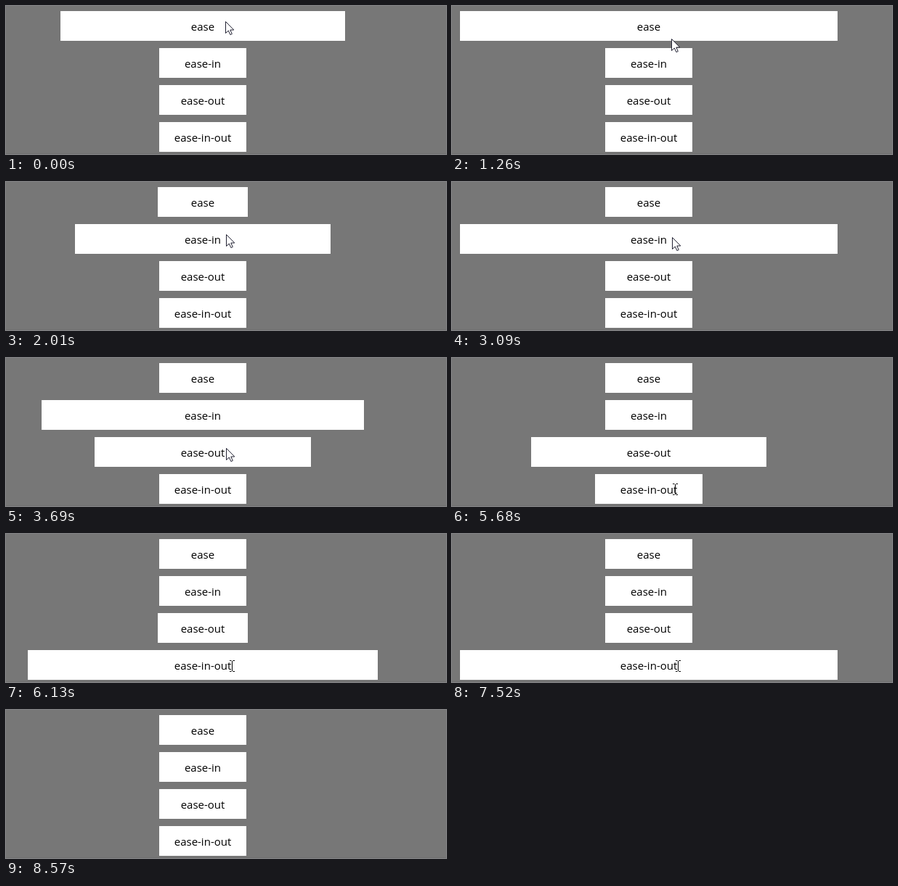
An HTML page that plays this animation: 606x204 px, repeating every 9.55 s.

```html
<!DOCTYPE html>
<html lang="en">
<head>
<meta charset="utf-8">
<title>Easing demo</title>
<style>
html, body { margin: 0; width: 100%; height: 100%; overflow: hidden; background: #777; }
#stage { position: relative; width: 606px; height: 204px; overflow: hidden; box-shadow: inset 0 -1px #707070; }
.box {
  position: absolute; height: 41px; background: #fff; color: #000;
  font: 15px/42px "Open Sans", "Noto Sans", sans-serif; text-align: center; white-space: nowrap;
}
svg { position: absolute; left: 0; top: 0; }
</style>
</head>
<body>
<div id="stage">
  <svg width="606" height="204" style="z-index:1">
    <path id="arrow" d="M.5 .5V16.5L4.3 13L6.9 18.6L9.3 17.5L6.8 12H11.8Z" fill="#fff" stroke="#223" stroke-linejoin="round"/>
    <path id="beam" d="M-3.5 -7.5H-1M1 -7.5H3.5M-3.5 7.5H-1M1 7.5H3.5M0 -7V7" fill="none" stroke="#000"/>
  </svg>
</div>
<script>
const LOOP = 9550, DURATION = 750, CENTER = 271, NARROW = 120, GROWTH = 400;

// label, bezier control points, time the pointer enters, time it leaves
const boxes = [
  ['ease', [.25, .1, .25, 1], -298, 1357],
  ['ease-in', [.42, 0, 1, 1], 1470, 3410],
  ['ease-out', [0, 0, .58, 1], 3465, 5429],
  ['ease-in-out', [.42, 0, .58, 1], 5541, 7814],
];

// stretches of movement: start, end, step
const runs = [
  [0, 480, 120], [1260, 2310, 150], [3090, 4290, 150], [5380, 6280, 150], [7520, 8570, 150],
];

// pointer: time, x, y, shape
const pointer = [
  [0, 302, 21, 'arrow'], [1259, 302, 21, 'arrow'], [1260, 302, 45, 'arrow'],
  [1410, 302, 53, 'arrow'], [1560, 303, 66, 'arrow'], [1710, 303, 72, 'arrow'],
  [3089, 303, 72, 'arrow'], [3090, 303, 76, 'arrow'], [3390, 303, 97, 'arrow'],
  [3540, 303, 116, 'arrow'], [3690, 303, 124, 'arrow'],
  [5379, 303, 124, 'arrow'], [5380, 304, 146, 'arrow'], [5530, 306, 159, 'arrow'],
  [5680, 307.5, 181, 'beam'], [5830, 311.5, 182, 'beam'],
  [7520, 311.5, 182, 'beam'], [7670, 312, 192, 'arrow'], [7820, 312, 201, 'arrow'],
  [7970, 312, 215, 'none'], [LOOP, 312, 215, 'none'],
];

const curve = (a, b, s) => 3 * a * s * (1 - s) ** 2 + 3 * b * s * s * (1 - s) + s ** 3;

function ease([x1, y1, x2, y2], t) {
  if (t <= 0) return 0;
  if (t >= 1) return 1;
  let lo = 0, hi = 1;
  for (let i = 0; i < 30; i++) {
    const mid = (lo + hi) / 2;
    if (curve(x1, x2, mid) < t) lo = mid; else hi = mid;
  }
  return curve(y1, y2, lo);
}

function snap(t) {
  const [start, end, step] = runs.findLast(run => run[0] <= t);
  return Math.min(end, start + Math.floor((t - start) / step) * step);
}

const stage = document.getElementById('stage');
const shapes = ['arrow', 'beam'].map(id => document.getElementById(id));
const items = boxes.map(([label], i) => {
  const el = document.createElement('div');
  el.className = 'box';
  el.textContent = label;
  el.style.top = 7 + 51 * i + 'px';
  return stage.appendChild(el);
});

function draw(t) {
  boxes.forEach(([, bezier, enter, leave], i) => {
    const open = ease(bezier, (t - enter) / DURATION) - ease(bezier, (t - leave) / DURATION);
    const half = Math.round((NARROW + GROWTH * open) / 2);
    items[i].style.left = CENTER - half + 'px';
    items[i].style.width = 2 * half + 'px';
  });

  const k = pointer.findLastIndex(p => p[0] <= t);
  const [t0, x0, y0, shape] = pointer[k];
  const [t1, x1, y1] = pointer[k + 1];
  const f = (t - t0) / (t1 - t0);
  const x = x0 + (x1 - x0) * f, y = Math.round(y0 + (y1 - y0) * f);
  for (const el of shapes) {
    el.style.display = el.id === shape ? '' : 'none';
    el.setAttribute('transform', `translate(${Math.round(x * 2) / 2} ${y})`);
  }
}

const begin = performance.now();
function tick() {
  draw(snap((performance.now() - begin) % LOOP));
  requestAnimationFrame(tick);
}
tick();
</script>
</body>
</html>
```
